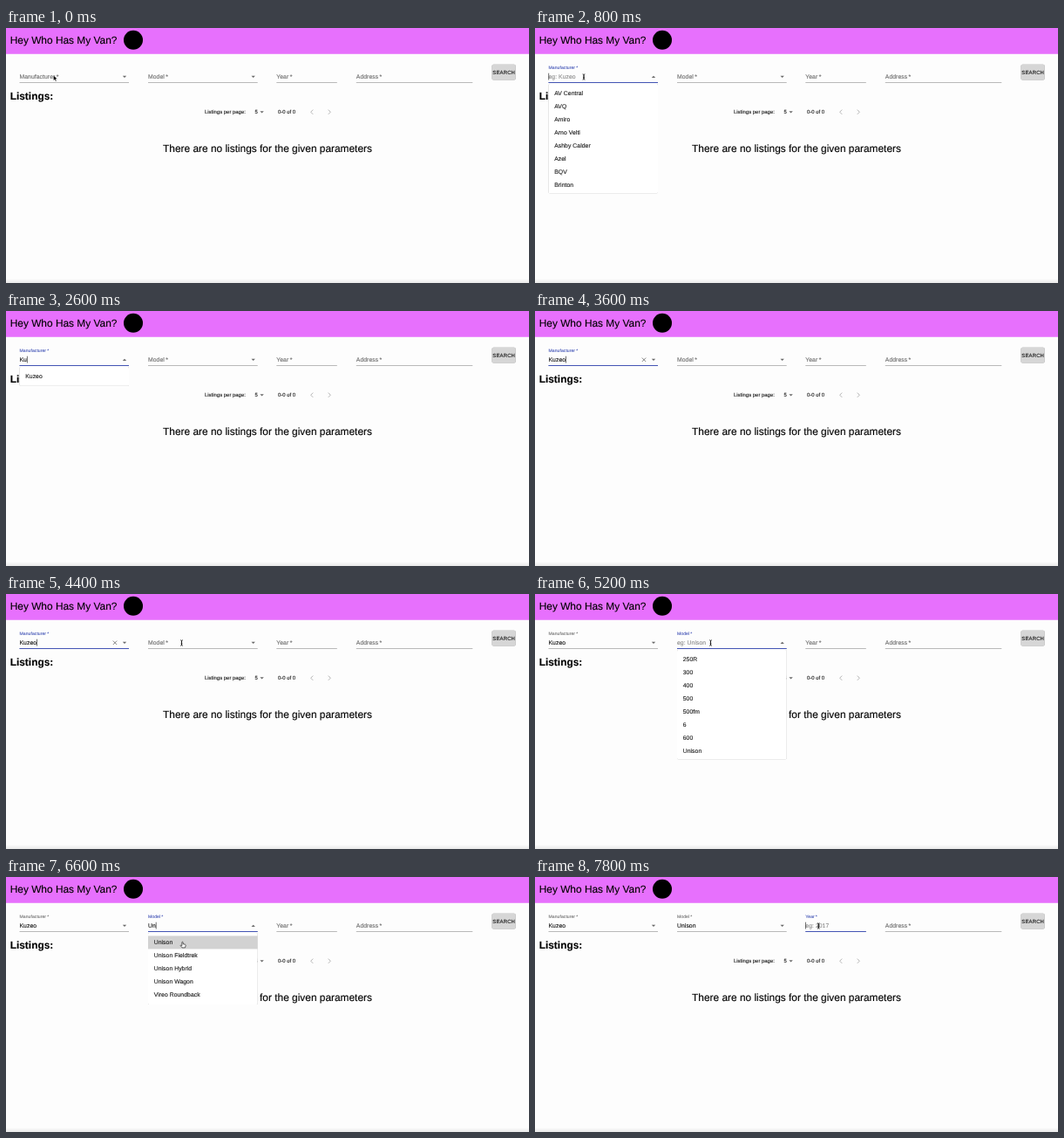
Write an HTML page that moves like this. It is 600x292 px and loops after 8 s.

```html
<!DOCTYPE html>
<html lang="en">
<head>
<meta charset="utf-8">
<title>Car search</title>
<style>
  html, body { margin: 0; width: 100%; height: 100%; overflow: hidden; background: #fdfdfd; }
  svg { display: block; width: 600px; height: 292px; font-family: "Liberation Sans", Arial, sans-serif; }
  text { white-space: pre; text-rendering: geometricPrecision; fill: currentColor; stroke: currentColor; stroke-width: .12px; }
  .big { font-size: 11.9px; color: #000; }
  .body { font-size: 6.8px; letter-spacing: .064px; color: #1c1c1c; }
  .small { font-size: 5.95px; color: #1c1c1c; }
  .icon { fill: #6a6a6a; }
  .chev { fill: none; stroke: #a8a8a8; stroke-width: .85; }
  .paper { fill: #fff; filter: drop-shadow(0 .7px .45px rgba(0,0,0,.36)); }
  .button { fill: #d6d6d6; filter: drop-shadow(0 .7px .6px rgba(0,0,0,.4)); }
  .cross { stroke: #6a6a6a; stroke-width: .8; }
</style>
</head>
<body>
<svg id="stage" viewBox="0 0 600 292">
  <defs>
    <linearGradient id="fade" x2="0" y2="1">
      <stop offset="0" stop-color="#fdfdfd"/>
      <stop offset="1" stop-color="#e9e9e9"/>
    </linearGradient>
  </defs>
  <rect width="600" height="292" fill="#fdfdfd"/>
  <rect width="600" height="29.75" fill="#e770fd"/>
  <rect y="287" width="600" height="5" fill="url(#fade)"/>
  <text class="big" x="4.7" y="17.6">Hey Who Has My Van?</text>
  <circle cx="146" cy="13.7" r="11"/>
  <rect class="button" x="557.5" y="41.7" width="27.2" height="17.7" rx="1.7"/>
  <text class="small" x="571.2" y="52.6" text-anchor="middle" letter-spacing=".17">SEARCH</text>
  <text class="big" x="4.7" y="82.4" font-weight="bold">Listings:</text>
  <text class="small" x="228" y="98.4">Listings per page:</text>
  <text class="small" x="285.6" y="98.4">5</text>
  <path class="icon" d="M291.4 95.2h4.4l-2.2 2.2z"/>
  <text class="small" x="312" y="98.4">0-0 of 0</text>
  <path class="chev" d="M352.2 93.6l-2.5 2.6 2.5 2.6M369.8 93.6l2.5 2.6-2.5 2.6"/>
  <text class="big" x="300" y="142.1" text-anchor="middle">There are no listings for the given parameters</text>
  <g id="fields"></g>
  <g id="pointer"></g>
</svg>
<script>
const LOOP = 8000, STEP = 200, ROW = 15.05, ROWS = 8;
const makers = ['AV Central', 'AVQ', 'Amiro', 'Arno Velti', 'Ashby Calder', 'Azel', 'BQV', 'Brinton',
  'Brackwell Motor Coach Works', 'Dorniken', 'Eskola', 'Falkrud', 'Kelvora', 'Kuzeo', 'Lankorp', 'Orrik'];
const models = ['250R', '300', '400', '500', '500fm', '6', '600', 'Unison', 'Unison Fieldtrek',
  'Unison Hybrid', 'Unison Wagon', 'Vireo Roundback', 'Vireo Wagon Duo', 'Voluta', 'Zurra'];

// Times in ms; "typed" holds [time, text], spans are [from, to].
const fields = [
  { x: 15.5, w: 125.5, label: 'Manufacturer', hint: 'eg: Kuzeo', list: makers,
    focus: [330, 4530], open: [600, 3600], hover: [3400, 3600], clear: [3600, 4600],
    typed: [[2200, 'K'], [2600, 'Ku'], [2800, 'Kuz'], [3000, 'Kuze'], [3200, 'Kuzeo']],
    caret: [[600, 1000], [1600, 2000], [2200, 4600]] },
  { x: 163, w: 125.7, label: 'Model', hint: 'eg: Unison', list: models,
    focus: [4530, 7530], open: [4800, 6800], hover: [6400, 6800], clear: [6800, 7600],
    typed: [[5400, 'U'], [5600, 'Un'], [6800, 'Unison']],
    caret: [[4800, 5200], [5400, 7600]] },
  { x: 310.3, w: 69.5, label: 'Year', hint: 'eg: 2017', focus: [7530, LOOP], caret: [[7600, LOOP]] },
  { x: 401.8, w: 133.5, label: 'Address', focus: [LOOP, LOOP] }
];

// [time, x, y, shape]; the pointer glides between keys at most GLIDE apart.
const GLIDE = 400;
const path = [
  [0, 54.4, 54, 'arrow'], [200, 55.5, 56, 'beam'], [800, 56, 56, 'beam'], [1000, 60, 57, 'beam'], [1200, 0, 0, ''],
  [4000, 118, 50, 'arrow'], [4200, 152, 53, 'arrow'], [4400, 201.5, 56, 'beam'], [5400, 0, 0, ''],
  [6000, 201.5, 59, 'beam'], [6200, 202, 68, 'hand'], [6400, 203.2, 77.8, 'hand'], [6600, 203.2, 77.8, 'hand'],
  [6800, 201, 75, 'arrow'], [7000, 201, 75, 'arrow'], [7400, 284, 62, 'arrow'], [7600, 325.3, 56, 'beam']
];
const shapes = {
  arrow: '<path d="M0 0v6.3l1.5-1.3 1 2.3 1.1-.5-1-2.2h2z" stroke="#fff" stroke-width=".5"/>',
  beam: '<path d="M-1.4-3.2q1.4 0 1.4.9v4.6q0 .9-1.4.9M1.4-3.2Q0-3.2 0-2.3v4.6q0 .9 1.4.9M-.9.8h1.8" fill="none" stroke="#111" stroke-width=".75"/>',
  hand: '<path d="M-1.3-3.2q.7-.7 1.2.1v2l2.5.6q.7.3.5 1.2L2.3 3.1h-3.5L-3 .7q.2-.9 1.1-.2l.6.4z" fill="#fff" stroke="#111" stroke-width=".65"/>'
};

const layer = document.getElementById('fields');
const pointer = document.getElementById('pointer');
const pen = document.createElement('canvas').getContext('2d');
pen.font = '68px "Liberation Sans", Arial, sans-serif';

const within = (t, span) => !!span && t >= span[0] && t < span[1];
const latest = (t, keys) => keys.filter(k => k[0] <= t).pop();
const mix = (a, b, p) => a + (b - a) * p;
const textWidth = s => pen.measureText(s).width / 10 + s.length * .064;
const easeOut = p => 1 - (1 - Math.min(1, Math.max(0, p))) ** 3;
const text = (x, y, s, more = '') => `<text class="body" x="${x}" y="${y}" ${more}>${s}</text>`;

function popup(f, query, t) {
  const items = f.list.filter(s => s.toLowerCase().includes(query.toLowerCase())).slice(0, ROWS);
  const height = Math.min(items.length * ROW + 6.8, 125.3);
  let out = `<rect class="paper" x="${f.x}" y="64" width="${f.w}" height="${height}" rx="1.5"/>`;
  if (within(t, f.hover))
    out += `<rect x="${f.x}" y="67.4" width="${f.w}" height="${ROW}" fill="#d2d2d2"/>`;
  return out + items.map((s, i) => text(f.x + 6.7, 77.1 + i * ROW, s)).join('');
}

function field(f, t) {
  const focused = within(t, f.focus), open = within(t, f.open);
  const value = (latest(t, f.typed || []) || [0, ''])[1];
  const p = easeOut((t - f.focus[0]) / 200);
  const right = f.x + f.w, mid = f.x + f.w / 2;
  let out = `<rect x="${f.x}" y="62" width="${f.w}" height=".6" fill="#8c8c8c"/>`;
  if (focused)
    out += `<rect x="${mid - f.w / 2 * p}" y="62" width="${f.w * p}" height=".95" fill="#3f51b5"/>`;
  out += `<g transform="translate(${f.x} ${mix(58.1, 47, p)}) scale(${mix(1, .75, p)})">` +
    text(0, 0, f.label + '\u2009*', `style="color:${focused ? '#3f51b5' : '#6e6e6e'}"`) + '</g>';
  if (value) out += text(f.x, 57.5, value, 'style="color:#111"');
  else if (focused) out += text(f.x, 57.5, f.hint, `style="color:#8c8c8c" opacity="${p}"`);
  if (f.list)
    out += `<path class="icon" transform="translate(${right - 5} 55.9) scale(1 ${open ? -1 : 1})" d="M-2.2-1.1h4.4L0 1.1z"/>`;
  if (within(t, f.clear))
    out += `<path class="cross" transform="translate(${right - 16} 55.8)" d="M-2.2-2.2l4.4 4.4M2.2-2.2l-4.4 4.4"/>`;
  if ((f.caret || []).some(s => within(t, s)))
    out += `<rect x="${f.x + textWidth(value)}" y="51.7" width=".6" height="7.8" fill="#111"/>`;
  return out + (open ? popup(f, value, t) : '');
}

function cursor(t) {
  const a = latest(t, path), b = path[path.indexOf(a) + 1];
  if (!a[3]) return '';
  const moving = b && b[3] && b[0] - a[0] <= GLIDE;
  const p = moving ? (t - a[0]) / (b[0] - a[0]) : 0;
  const [x, y] = moving ? [mix(a[1], b[1], p), mix(a[2], b[2], p)] : [a[1], a[2]];
  return `<g transform="translate(${x} ${y})">${shapes[a[3]]}</g>`;
}

let shown = -1;
const start = performance.now();
function draw() {
  const t = Math.floor(((performance.now() - start) % LOOP) / STEP) * STEP;
  if (t !== shown) {
    shown = t;
    layer.innerHTML = fields.map(f => field(f, t)).join('');
    pointer.innerHTML = cursor(t);
  }
  requestAnimationFrame(draw);
}
draw();
</script>
</body>
</html>
```
